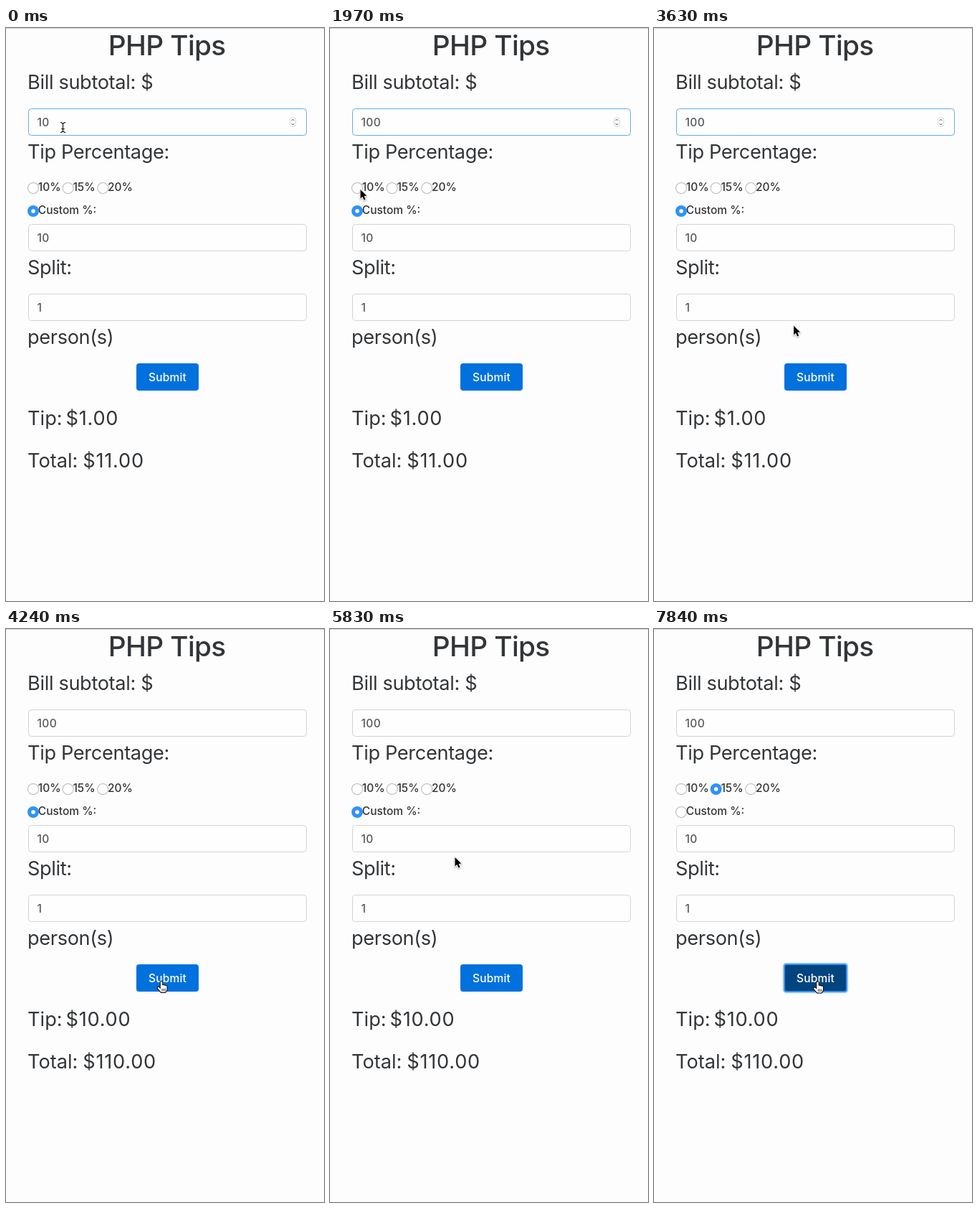
An HTML page with a canvas that plays this animation: 444 px wide and 798 px high, repeating every 8000 ms.

```html
<!DOCTYPE html>
<html lang="en">
<head>
<meta charset="utf-8">
<title>PHP Tips</title>
<style>
  html, body { margin: 0; width: 100%; height: 100%; overflow: hidden; background: #fdfdfd; }
  canvas { display: block; width: 444px; height: 798px; }
</style>
</head>
<body>
<canvas id="stage"></canvas>
<script>
const W = 444, H = 798, LOOP = 8000;
const canvas = document.getElementById('stage');
const c = canvas.getContext('2d');
const dpr = window.devicePixelRatio || 1;
canvas.width = W * dpr;
canvas.height = H * dpr;

const FONT = 'Inter, Roboto, sans-serif';
const INK = '#333639';
const FIELD = { x: 31, w: 389, h: 38 };
const BUTTON = { x: 182, y: 467, w: 87, h: 38 };

// Moments in the story, in ms
const TYPED = 390, REFOCUS = 3060, SUBMIT = 4040, RELOAD = 4240, PICK = 6620, RESUBMIT = 7800;

const START = { x: 79, y: 138 };
const MOVES = [
  { from: 710, to: 1150, x: 38, y: 217 },
  { from: 1580, to: 1950, x: 42, y: 224 },
  { from: 2030, to: 2230, x: 119, y: 366 },
  { from: 2490, to: 2760, x: 217, y: 490 },
  { from: 4980, to: 5770, x: 174, y: 317 },
  { from: 5970, to: 6450, x: 88, y: 229 },
  { from: 7030, to: 7370, x: 205, y: 518 },
  { from: 7510, to: 7840, x: 229, y: 490 }
];
const DETOUR = { from: 3010, to: 3800, x: -27, y: -92 };

const clamp = v => Math.max(0, Math.min(1, v));
const progress = (m, t) => clamp((t - m.from) / (m.to - m.from));
const mix = (a, b, k) => `rgb(${a.map((v, i) => Math.round(v + (b[i] - v) * k))})`;
const inside = (p, r) => p.x >= r.x && p.x < r.x + r.w && p.y >= r.y && p.y < r.y + r.h;

// The pointer advances in 50 ms steps
function pointerAt(time) {
  const t = Math.floor((time - 10) / 50) * 50 + 10;
  let { x, y } = START;
  for (const m of MOVES) {
    const u = progress(m, t), k = u * u * (3 - 2 * u);
    x += (m.x - x) * k;
    y += (m.y - y) * k;
  }
  const away = Math.sqrt(Math.max(0, Math.sin(Math.PI * progress(DETOUR, t))));
  return { x: x + DETOUR.x * away, y: y + DETOUR.y * away };
}

// Hover colour fades in and out over 150 ms
function hoverLevel(t) {
  if (t >= RELOAD && t < 5000) return 0;
  let sum = 0;
  for (let i = 1; i <= 10; i++) sum += inside(pointerAt(t - i * 15), BUTTON);
  return sum / 10;
}

function caretOn(t) {
  const since = t - (t < REFOCUS ? TYPED : REFOCUS);
  if (t < TYPED) return t >= 300;
  return t < SUBMIT && since < 2000 && Math.floor(since / 500) % 2 === 0;
}

function text(str, x, y, size, { weight = 400, track = 0, color = INK, align = 'left' } = {}) {
  c.font = `${weight} ${size}px ${FONT}`;
  c.letterSpacing = track + 'px';
  c.textAlign = align;
  c.fillStyle = color;
  c.fillText(str, x, y);
}

const heading = (str, y) => text(str, 30, y, 27.2, { track: -0.36 });
const label = (str, x, y) => text(str, x, y, 15.5, { weight: 500 });

function result(name, value, x, y) {
  text(name, 30, y, 27.2);
  text(value, x, y, 27.2, { track: 0.75 });
}

function box(x, y, w, h, r, fill, stroke, width = 1) {
  c.beginPath();
  c.roundRect(x, y, w, h, r);
  if (fill) { c.fillStyle = fill; c.fill(); }
  if (stroke) { c.strokeStyle = stroke; c.lineWidth = width; c.stroke(); }
}

function line(color, width, ...points) {
  c.beginPath();
  points.forEach(([x, y]) => c.lineTo(x, y));
  c.strokeStyle = color;
  c.lineWidth = width;
  c.stroke();
}

function dot(x, y, r, fill) {
  c.beginPath();
  c.arc(x, y, r, 0, Math.PI * 2);
  c.fillStyle = fill;
  c.fill();
}

function spinner(y) {
  box(396.5, y + 12.5, 8, 13, 4, '#fff', '#d4d4d4');
  for (const s of [-1, 1]) {
    const m = y + 19 + s * 2;
    line('#555', 1, [398.7, m], [400.5, m + s * 2], [402.3, m]);
  }
}

function field(y, value, p, focused) {
  box(FIELD.x + 0.5, y + 0.5, FIELD.w - 1, FIELD.h - 1, 4, '#fefefe', focused ? '#62ade8' : '#d3d3d4');
  text(value, 43.6, y + 25, 15.5, { weight: 500, track: 0.3, color: '#55595c' });
  if (focused || inside(p, { ...FIELD, y })) spinner(y);
}

function radio(x, y, on) {
  dot(x, y, 8, on ? '#2f92f8' : '#b8b8b8');
  dot(x, y, on ? 2.8 : 7, '#fff');
}

function button(t) {
  const { x, y, w, h } = BUTTON;
  const pressed = [SUBMIT, RESUBMIT].some(s => t >= s && t < s + 200);
  box(x, y, w, h, 4, pressed ? '#01447f' : mix([0, 113, 221], [0, 88, 168], hoverLevel(t)));
  if (pressed) {
    box(x - 1, y - 1, w + 2, h + 2, 4, null, 'rgba(110,180,255,.45)', 3);
    box(x, y, w, h, 3, null, '#3b93ee', 2);
  }
  text('Submit', x + w / 2, 492, 15.5, { weight: 500, track: 0.2, color: '#fff', align: 'center' });
}

function arrow() {
  const shape = new Path2D('M.5 1V13.6L3.4 10.9L5.4 15.6L7.6 14.7L5.6 10L9.4 9.8Z');
  c.save();
  c.shadowColor = 'rgba(0,0,0,.35)';
  c.shadowBlur = 2 * dpr;
  c.shadowOffsetY = dpr;
  c.lineJoin = 'round';
  c.lineWidth = 2;
  c.strokeStyle = '#fff';
  c.stroke(shape);
  c.restore();
  c.fillStyle = '#000';
  c.fill(shape);
}

// Fingers, thumb and palm: thick dark strokes with white ones on top
function hand() {
  c.lineCap = 'round';
  for (const [color, grow] of [['#111', 2.2], ['#fff', 0]]) {
    for (let i = 0; i < 4; i++) line(color, 2.4 + grow, [i * 2.1, i ? 6.5 + i * 0.5 : 2], [i * 2.1, 12]);
    line(color, 2.4 + grow, [-4, 10], [0, 14.5]);
    line(color, 5 + grow, [1.8, 13.3], [4.2, 13.3]);
  }
  for (let i = 0; i < 3; i++) line('#111', 0.8, [1 + i * 2.1, 11], [1 + i * 2.1, 14]);
  c.lineCap = 'butt';
}

function beam() {
  c.lineCap = 'round';
  for (const [color, width] of [['rgba(255,255,255,.9)', 3], ['#111', 1.2]]) {
    for (const s of [-1, 1]) {
      line(color, width, [-2.5, 0.5 + s * 7], [0.5, 0.5 + s * 5.5], [3.5, 0.5 + s * 7]);
    }
    line(color, width, [0.5, -5], [0.5, 6]);
    line(color, width, [-1.3, 2.5], [2.3, 2.5]);
  }
  c.lineCap = 'butt';
}

function pointer(p, texts) {
  c.save();
  c.translate(p.x, p.y);
  if (inside(p, BUTTON)) hand();
  else if (texts.some(r => inside(p, r))) beam();
  else arrow();
  c.restore();
}

function draw(t) {
  const p = pointerAt(t);
  const fields = [112, 273, 370];
  const values = [t < TYPED ? '10' : '100', '10', '1'];
  const sent = t >= RELOAD, custom = t < PICK;

  c.setTransform(dpr, 0, 0, dpr, 0, 0);
  c.fillStyle = '#fdfdfd';
  c.fillRect(0, 0, W, H);
  c.fillStyle = '#cfcfcf';
  c.fillRect(0, 0, W, 1);

  text('PHP Tips', 142.8, 38, 38.8, { weight: 500, track: -0.65 });
  heading('Bill subtotal: $', 85);
  heading('Tip Percentage:', 182);
  heading('Split:', 343);
  heading('person(s)', 440);

  fields.forEach((y, i) => field(y, values[i], p, i === 0 && t < SUBMIT));
  if (caretOn(t)) {
    c.fillStyle = '#333';
    c.fillRect(t < TYPED ? 62 : 72, 122, 1, 18);
  }

  ['10%', '15%', '20%'].forEach((name, i) => {
    const x = 38 + i * 48.6;
    radio(x, 223, i === 1 && !custom);
    label(name, x + 6.8, 227.3);
  });
  radio(38, 255, custom);
  label('Custom %:', 44.8, 259.3);

  button(t);
  result('Tip:', sent ? '$10.00' : '$1.00', 83.5, 553);
  result('Total:', sent ? '$110.00' : '$11.00', 107.3, 612);

  const title = { x: 31, y: 158, w: 196, h: 32 };
  pointer(p, [title, ...fields.map(y => ({ ...FIELD, y }))]);
}

const start = performance.now();
function tick() {
  draw((performance.now() - start) % LOOP);
  requestAnimationFrame(tick);
}
tick();
</script>
</body>
</html>
```
